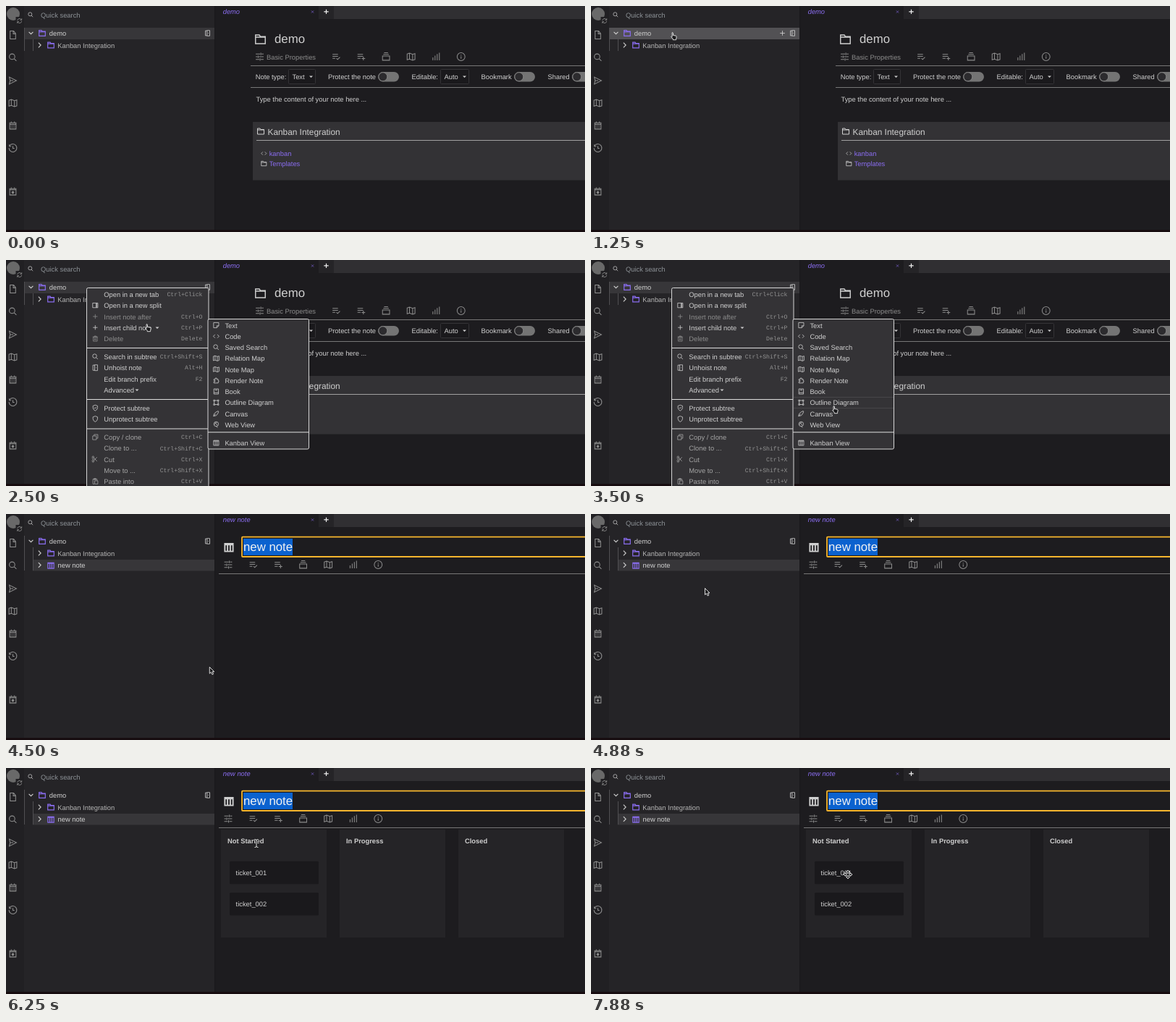
An HTML page that plays this animation: 800 by 312 pixels, repeating every 8 s.

```html
<!DOCTYPE html>
<html lang="en">
<head>
<meta charset="utf-8">
<title>Note board demo</title>
<style>
html, body { margin: 0; width: 100%; height: 100%; overflow: hidden; background: #1d1c1f; }
svg { display: block; width: 800px; height: 312px; }
text { font-family: "Liberation Sans", Arial, sans-serif; font-size: 9.35px; text-rendering: geometricPrecision; white-space: pre; }
.mono { font-family: "Liberation Mono", monospace; font-size: 8.18px; }
</style>
</head>
<body>
<svg id="stage" viewBox="0 0 800 312"></svg>
<script>
const LOOP = 8000, STEP = 125;
const INK = '#d0d0d0', DIM = '#8c8c8c', PURPLE = '#8a6df0', TREE = '#252427', MAIN = '#1d1c1f', MENU = '#343336';

// Line icons on a 24-unit grid
const ICONS = {
  folder: 'M3 20V4h7l2 3h9v13zM3 8h18',
  file: 'M5 2h9l5 6v14H5zM13 2v7h6',
  search: 'M17 10a7 7 0 1 1-14 0a7 7 0 1 1 14 0M15 15l6 6',
  send: 'M3 3l18 9-18 9 2-9zM5 12h8',
  map: 'M2 5l6-2 8 3 6-2v15l-6 2-8-3-6 2zM8 3v15M16 6v15',
  calendar: 'M4 5h16v16H4zM4 9h16M8 2v4M16 2v4M7 13h2m2 0h2m2 0h2M7 17h2m2 0h2m2 0h2',
  event: 'M4 5h16v16H4zM4 8h16M8 2v4M16 2v4M12 11v7M8.500 14.500h7M10 17l4-5M10 12l4 5',
  history: 'M4 6a10 10 0 1 1-2 6M3 3v5h5M12 7v6h4',
  sync: 'M4 11a8 8 0 0 1 15-3M20 3v6h-6M20 13a8 8 0 0 1-15 3M4 21v-6h6',
  down: 'M5 8l7 7 7-7',
  right: 'M8 4l8 8-8 8',
  plus: 'M12 4v16M4 12h16',
  split: 'M10 3H4v18h6M10 2h10v20H10zM14 12h2',
  cross: 'M6 6l12 12M18 6L6 18',
  sliders: 'M2 5h11M17 5h5M15 2v6M2 12h4M10 12h12M8 9v6M2 19h9M15 19h7M13 16v6',
  check: 'M3 6h14M3 11h14M3 16h7M13 16l3 3 6-6',
  listAdd: 'M3 6h14M3 11h14M3 16h8M18 12v9M13.500 16.500h9',
  stack: 'M3 10h18v11H3zM5 6h14M7 2h10',
  bars: 'M4 21v-7M9.500 21V9M15 21V5M20.500 21V2',
  info: 'M22 12a10 10 0 1 1-20 0a10 10 0 1 1 20 0M12 11v6M12 7v2',
  code: 'M8 6l-6 6 6 6M16 6l6 6-6 6',
  board: 'M3 4h18v17H3zM3 6h18M9 6v15M15 6v15',
  note: 'M3 3h18v11l-7 7H3zM14 21v-7h7',
  panel: 'M3 4h18v16H3zM15 4v16M18 4v16',
  trash: 'M5 7h14v14H5zM3 6h18M9 6V3h6v3M10 10v8M14 10v8',
  shield: 'M12 2l8 3v6q0 7-8 11q-8-4-8-11V5z',
  shieldOn: 'M12 2l8 3v6q0 7-8 11q-8-4-8-11V5zM8 11l3 3 5-5',
  copy: 'M3 8h13v13H3zM8 8V3h13v13h-5',
  cut: 'M4 4l14 15M4 20L18 5M7 6a3 3 0 1 1-5 0a3 3 0 1 1 5 0M7 18a3 3 0 1 1-5 0a3 3 0 1 1 5 0',
  paste: 'M4 4h14v5M4 4v17h5M8 2h6v4H8zM10 10h11v11H10z',
  extension: 'M4 8h5V4h5v4h5v5h2v4h-2v4H4v-5h4v-4H4z',
  book: 'M4 3h16v18H4zM4 16h16M8 7h8',
  nodes: 'M3 3h4v4H3zM17 3h4v4h-4zM3 17h4v4H3zM17 17h4v4h-4zM7 5h10M7 19h10M5 7v10M19 7v10',
  pen: 'M3 21q0-10 8-14l8-4q2 1 1 4l-4 8q-4 6-10 5zM3 21l8-8',
  globe: 'M20 10a8 8 0 1 1-16 0a8 8 0 1 1 16 0M8 5l8 9M5 12l9-9M12 18l5 4'
};

const rect = (x, y, w, h, fill, extra = '') => `<rect x="${x}" y="${y}" width="${w}" height="${h}" fill="${fill}" ${extra}/>`;
const text = (x, y, str, fill = INK, extra = '') => `<text x="${x}" y="${y}" fill="${fill}" ${extra}>${str}</text>`;
const path = (d, stroke, extra = '') => `<path d="${d}" fill="none" stroke="${stroke}" ${extra}/>`;
const icon = (name, cx, cy, size = 12, color = DIM, weight = 2) =>
  `<g transform="translate(${cx - size / 2} ${cy - size / 2}) scale(${size / 24})">${path(ICONS[name], color, `stroke-width="${weight}"`)}</g>`;
const caret = (x, y) => `<path d="M${x - 2.5} ${y - 1}h5l-2.500 2.600z" fill="${INK}"/>`;
const group = (id, body) => `<g id="${id}">${body}</g>`;
const bold = 'font-weight="bold"';

function frameParts() {
  const side = [['file', 40], ['search', 71], ['send', 103], ['map', 134], ['calendar', 165], ['history', 196], ['event', 256]];
  return rect(0, 0, 800, 312, MAIN) + rect(0, 0, 25, 312, '#212023') + rect(25, 0, 263, 312, TREE) +
    rect(288, 0, 1, 312, '#19181b') +
    rect(432, 0, 21, 18, '#252427') + rect(453, 0, 347, 18, '#302f32') +
    '<circle cx="10" cy="11" r="9" fill="#696969"/>' + rect(13.5, 15, 10, 11, '#212023') + icon('sync', 18.7, 20.5, 9, '#9a9a9a') +
    side.map(([name, y]) => icon(name, 9.5, y, 13, '#8f8f8f', 1.9)).join('') +
    icon('search', 34, 12, 8.5, INK) + text(48, 16, 'Quick search', '#8d9297') +
    icon('cross', 423.5, 8, 6.5, PURPLE, 2.2) + icon('plus', 442.5, 7.8, 9.5, '#f0f0f0', 3);
}

function treeParts() {
  return group('demoRow', rect(25, 30, 263, 16, '#373639')) + group('demoHover', rect(25, 30, 263, 16, '#525154') + icon('plus', 264.5, 37.5, 10, INK)) +
    group('childHover', rect(37, 46, 251, 16, '#464548') + icon('plus', 264.5, 54, 10, INK)) +
    group('newRow', rect(37, 63, 251, 15.5, '#373639') + path('M25.500 62v16M37.500 62v16', '#504f52') +
      icon('right', 46.5, 70.5, 10, INK, 2.6) + icon('board', 62, 71, 11, PURPLE, 2.6) + text(71.5, 74.3, 'new note')) +
    path('M25.500 30v32M37.500 46v16', '#504f52') +
    icon('down', 34.5, 37.5, 10, INK, 2.6) + icon('folder', 50, 37.5, 11.5, PURPLE, 2.4) + text(59.8, 41.3, 'demo') +
    icon('split', 278.5, 37.5, 9, INK, 2.2) +
    icon('right', 46.5, 54, 10, INK, 2.6) + icon('folder', 62, 54, 11.5, PURPLE, 2.4) + text(71.3, 57.9, 'Kanban Integration', '#b5b5b5');
}

const toolbar = dx => ['check', 'listAdd', 'stack', 'map', 'bars', 'info']
  .map((name, i) => icon(name, dx + i * 34.55, 70, 13, DIM, 1.9)).join('');
const tab = name => text(299.7, 10.7, name, PURPLE, 'font-style="italic"');

function folderNote() {
  const toggle = x => rect(x, 91, 29, 13.5, '#747474', 'rx="6.75"') + `<circle cx="${x + 6.8}" cy="97.700" r="6" fill="#2c2b2e" stroke="#858585"/>`;
  const select = (x, w, label) => rect(x + .5, 87.5, w, 20, '#1a191c', 'stroke="#343336" rx="1"') + text(x + 5.5, 101, label) + caret(x + w - 5.5, 97.5);
  return tab('demo') + icon('folder', 351.5, 46, 18, INK, 1.9) + text(371, 51.2, 'demo', INK, 'style="font-size:16.800px"') +
    icon('sliders', 350.5, 70, 13) + text(360, 74, 'Basic Properties', DIM) + toolbar(456) +
    path('M338 82.500H800M338 112.500H800', '#777') +
    text(344.7, 101, 'Note type:') + select(390, 37, 'Text') + text(445, 101, 'Protect the note') + toggle(514) +
    text(560.6, 101, 'Editable:') + select(600, 39, 'Auto') + text(656.6, 101, 'Bookmark') + toggle(702) +
    text(748.5, 101, 'Shared') + toggle(782) +
    text(345.5, 131.8, 'Type the content of your note here ...') +
    rect(341, 160, 459, 80.5, '#333235') + icon('folder', 352, 173, 12, INK) +
    text(361.5, 177.5, 'Kanban Integration', INK, 'style="font-size:11.850px"') + path('M346 185.500H800', '#a0a0a0') +
    icon('code', 356.3, 203.5, 8.5, INK) + text(363.7, 207.2, 'kanban', PURPLE) +
    icon('folder', 356.3, 217.5, 9.5, INK) + text(363.7, 221.3, 'Templates', PURPLE);
}

function boardNote() {
  const column = (title, i) => rect(297 + i * 164, 85, 146, 149, TREE) + text(306 + i * 164, 104.3, title, INK, bold);
  const card = (title, y) => rect(309, y, 123, 31.5, '#1a191c', 'rx="1.500"') + text(317.6, y + 18.9, title);
  return tab('new note') + icon('board', 308, 46, 15, INK, 3) +
    rect(326, 31.7, 480, 27.3, 'none', 'stroke="#f5b52e" stroke-width="1.800" rx="1"') +
    rect(328, 34, 68, 23, '#0b62cf') + text(328, 50.9, 'new note', '#f2f2f2', 'style="font-size:16.800px"') +
    icon('sliders', 307, 70, 13) + toolbar(341.5) + path('M294 82.500H800', '#777') +
    group('columns', ['Not Started', 'In Progress', 'Closed'].map(column).join('') + card('ticket_001', 128.7) + card('ticket_002', 172));
}

// Rows: [y, icon, label, shortcut, dimmed]
const MENU_ROWS = [
  [47.3, '', 'Open in a new tab', 'Ctrl+Click'], [62.6, 'panel', 'Open in a new split'],
  [78, 'plus', 'Insert note after', 'Ctrl+O', 1], [93.2, 'plus', 'Insert child note', 'Ctrl+P'], [108.5, 'trash', 'Delete', 'Delete', 1],
  [133.4, 'search', 'Search in subtree', 'Ctrl+Shift+S'], [148.7, 'split', 'Unhoist note', 'Alt+H'],
  [164, '', 'Edit branch prefix', 'F2'], [179.3, '', 'Advanced'],
  [204.2, 'shieldOn', 'Protect subtree'], [219.5, 'shield', 'Unprotect subtree'],
  [244.5, 'copy', 'Copy / clone', 'Ctrl+C', 2], [259.8, '', 'Clone to ...', 'Ctrl+Shift+C', 2], [275, 'cut', 'Cut', 'Ctrl+X', 2],
  [290.3, '', 'Move to ...', 'Ctrl+Shift+X', 2], [305.6, 'paste', 'Paste into', 'Ctrl+V', 2]
];
const TYPE_ROWS = [['note', 'Text'], ['code', 'Code'], ['search', 'Saved Search'], ['map', 'Relation Map'], ['map', 'Note Map'],
  ['extension', 'Render Note'], ['book', 'Book'], ['nodes', 'Outline Diagram'], ['pen', 'Canvas'], ['globe', 'Web View'], ['board', 'Kanban View']]
  .map(([name, label], i) => [90 + i * 15.25 + (i > 9 ? 9.8 : 0), name, label]);

function menuRows(rows, x) {
  return rows.map(([y, name, label, keys, dim]) => {
    const color = [INK, DIM, '#a5a5a5'][dim || 0];
    return (name ? icon(name, x - 12, y, 9.5, color) : '') + text(x, y + 3.5, label, color) +
      (keys ? text(271.5, y + 2.7, keys, '#929292', 'class="mono" text-anchor="end"') : '');
  }).join('');
}
const frame = 'stroke="#d6d6d6" rx="2"';
const menu = () => rect(111.5, 38.5, 168.5, 300, MENU, frame) + path('M112 121.500h168M112 192.500h168M112 233h168', '#dedede') +
  menuRows(MENU_ROWS, 135.3) + caret(209, 93.5) + caret(181, 179.5);
const submenu = () => rect(279, 81.5, 139.5, 179.5, MENU, frame) + path('M279 237.800h139', '#dedede') +
  group('rowHover', path('M280 -7.300h138M280 7.700h138', '#48474a')) + menuRows(TYPE_ROWS, 302.4);

const shape = (d, extra = '') => `<path d="${d}" fill="#1a1a1c" stroke="#f0f0f0" stroke-width=".9" stroke-linejoin="round" ${extra}/>`;
const CURSORS = {
  arrow: shape('M.5.5v9l2.100-1.900 1.600 3.300 1.600-.8-1.500-3.100h2.700z'),
  hand: shape('M2 .9q1.300-.8 1.500.6v2.900l3.700.8q1.100.3 1 1.500l-.6 2.600v1.400H3.200V9.400L.7 6.500q.4-1.100 1.500-.2z'),
  ibeam: path('M-2.500-5.500q2 0 2.500 1q.5-1 2.500-1M0-5v10M-2.500 5.500q2 0 2.500-1q.5 1 2.500 1', '#111', 'stroke-width="2.400"') +
    path('M-2.500-5.500q2 0 2.500 1q.5-1 2.500-1M0-5v10M-2.500 5.500q2 0 2.500-1q.5 1 2.500 1', '#eee'),
  move: shape('M0-6l2.300 2.600H1V-1h2.400v-1.300L6 0 3.400 2.300V1H1v2.400h1.300L0 6l-2.300-2.600H-1V1h-2.400v1.300L-6 0l2.600-2.300V-1H-1v-2.400h-1.300z')
};

// Pointer path: [step, x, y, shape]
const POINTER = [
  [1, 549, 262, 'arrow'], [4, 360, 170, 'arrow'], [7, 150, 82, 'arrow'], [8, 128, 42, 'hand'], [10, 110, 36, 'hand'],
  [13, 110, 36, 'hand'], [16, 139, 61, 'hand'], [18, 192, 88, 'hand'], [21, 192, 88, 'hand'], [24, 262, 90, 'hand'],
  [26, 310, 130, 'hand'], [28, 333, 201, 'hand'], [32, 322, 247, 'hand'], [35, 322, 247, 'arrow'], [39, 157, 102, 'arrow'],
  [42, 120, 52, 'hand'], [43, 200, 84, 'arrow'], [46, 650, 180, 'arrow'], [48, 332, 94, 'ibeam'], [50, 346, 104, 'ibeam'],
  [52, 350, 114, 'ibeam'], [54, 350, 114, 'ibeam'], [56, 352, 138, 'move'], [57, 352, 138, 'move'],
  [59, 326, 150, 'move'], [61, 355, 147, 'move'], [64, 355, 147, 'move']
];

const $ = id => document.getElementById(id);
$('stage').innerHTML = frameParts() + treeParts() + group('folderNote', folderNote()) + group('boardNote', boardNote()) +
  rect(0, 309, 800, 3, '#170d10') + group('menu', menu()) + group('submenu', submenu()) +
  group('pointer', Object.entries(CURSORS).map(([name, body]) => group(name, body)).join(''));

const show = (id, on) => $(id).setAttribute('display', on ? 'inline' : 'none');

function pointerAt(n) {
  const i = POINTER.findIndex((key, k) => k < POINTER.length - 1 && n >= key[0] && n < POINTER[k + 1][0]);
  if (i < 0) return null;
  const [a, ax, ay, kind] = POINTER[i], [b, bx, by] = POINTER[i + 1], u = (n - a) / (b - a);
  return { x: ax + (bx - ax) * u, y: ay + (by - ay) * u, kind };
}

function render(time) {
  const n = Math.floor(time % LOOP / STEP), created = n >= 35;
  show('folderNote', !created);
  show('boardNote', created);
  show('columns', n >= 40);
  show('demoRow', !created);
  show('newRow', created);
  show('demoHover', n >= 8 && n < 16);
  show('childHover', n === 42);
  show('menu', n >= 13 && !created);
  show('submenu', n >= 20 && !created);
  const p = pointerAt(n);
  show('pointer', p);
  if (!p) return show('rowHover', false);
  $('pointer').setAttribute('transform', `translate(${p.x} ${p.y})`);
  Object.keys(CURSORS).forEach(kind => show(kind, kind === p.kind));
  const row = p.x > 279 && TYPE_ROWS.find(([y]) => Math.abs(p.y + 1 - y) < 7.6);
  show('rowHover', row);
  if (row) $('rowHover').setAttribute('transform', `translate(0 ${row[0]})`);
}

function tick() {
  render(performance.now());
  requestAnimationFrame(tick);
}
tick();
</script>
</body>
</html>
```
